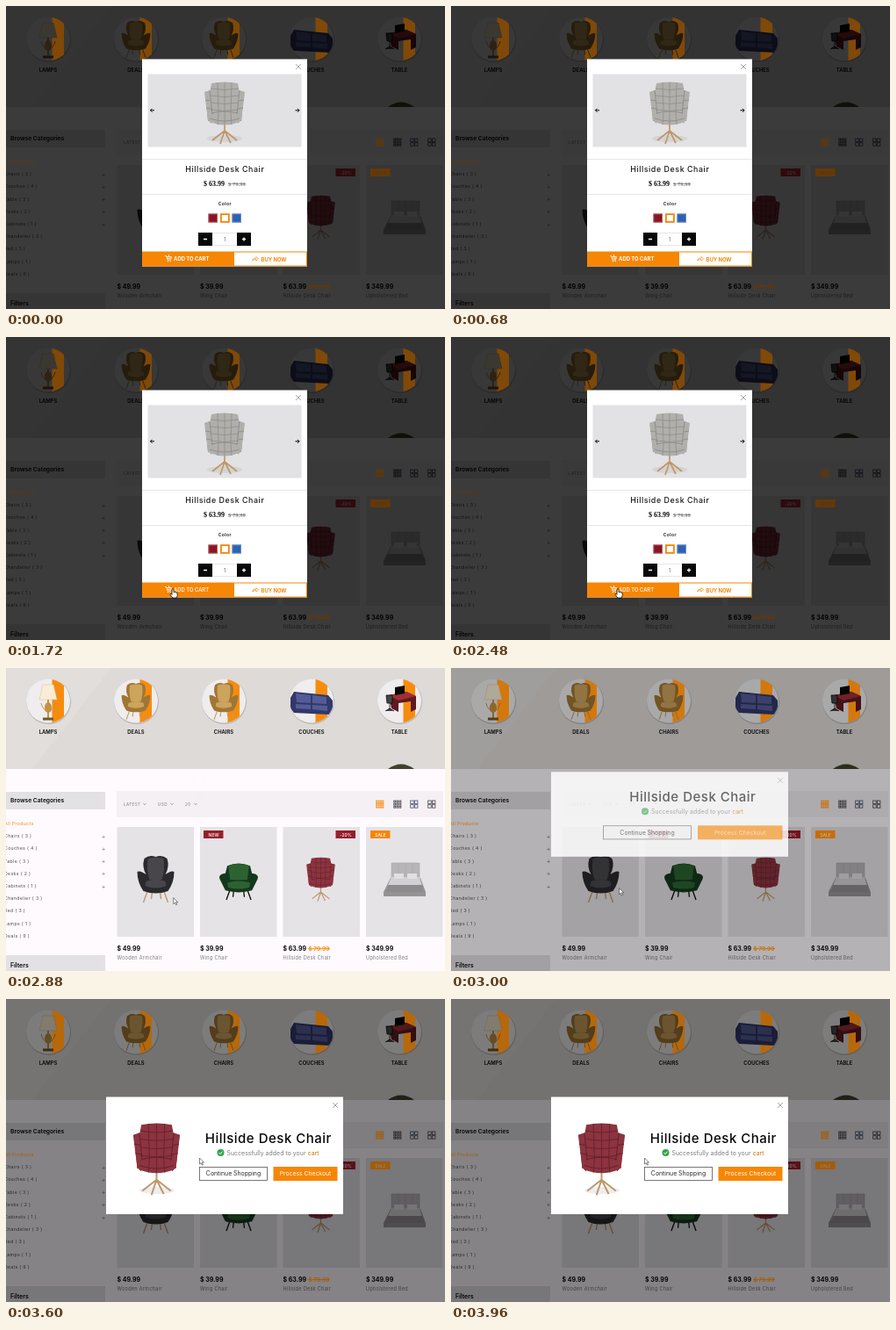
Animation of 500x345 px, one loop 4000 ms. Source, as an HTML page with a canvas:

```html
<!DOCTYPE html>
<html lang="en">
<head>
<meta charset="utf-8">
<title>Furniture shop: add to cart</title>
<style>
  html, body { margin: 0; width: 100%; height: 100%; overflow: hidden; }
  canvas { display: block; width: 500px; height: 345px; }
</style>
</head>
<body>
<canvas></canvas>
<script>
const canvas = document.querySelector('canvas');
const ctx = canvas.getContext('2d');
const ratio = window.devicePixelRatio || 1;
canvas.width = 500 * ratio;
canvas.height = 345 * ratio;

const LOOP = 4000;
const PRODUCT = 'Hillside Desk Chair';

// r, g, b and how strongly the colour follows the dimming of the page
const C = {
  white: [255, 255, 255], page: [255, 251, 255], black: [8, 8, 10], gray: [125, 123, 126],
  pale: [226, 225, 228], band: [229, 226, 230], bar: [245, 241, 245], card: [231, 228, 232],
  banner: [222, 219, 216], disc: [240, 238, 238], shadow: [188, 185, 183],
  orange: [246, 134, 4, .6], stripe: [246, 140, 14, .45], red: [150, 28, 40, .8],
  green: [50, 165, 75], blue: [42, 98, 180], wood: [190, 152, 105], gold: [196, 146, 66], icon: [70, 67, 76],
};
const FABRIC = {
  gray: [[176, 175, 171], [139, 138, 134]],
  red: [[140, 52, 64], [100, 32, 44]],
  green: [[44, 98, 48], [20, 56, 28]],
  dark: [[72, 70, 74], [42, 41, 45]],
  mustard: [[204, 164, 92], [160, 118, 52]],
  navy: [[84, 92, 152], [50, 56, 106]],
};

let light = 1;
const tone = ([r, g, b, power = 1]) =>
  `rgb(${[r, g, b].map(v => Math.round(v * light ** power))})`;
const clamp = v => Math.max(0, Math.min(1, v));
const progress = (t, start, length) => clamp((t - start) / length);
const mix = (a, b, p) => a + (b - a) * p;

function rect(x, y, w, h, color) {
  ctx.fillStyle = tone(color);
  ctx.fillRect(x, y, w, h);
}

function frame(x, y, w, h, color, width = 1) {
  ctx.strokeStyle = tone(color);
  ctx.lineWidth = width;
  ctx.strokeRect(x + width / 2, y + width / 2, w - width, h - width);
}

function shape(d, fill, stroke, width = 1) {
  const path = new Path2D(d);
  if (fill) { ctx.fillStyle = tone(fill); ctx.fill(path); }
  if (stroke) { ctx.strokeStyle = tone(stroke); ctx.lineWidth = width; ctx.stroke(path); }
}

function oval(x, y, rx, ry, color) {
  ctx.beginPath();
  ctx.ellipse(x, y, rx, ry, 0, 0, 7);
  ctx.fillStyle = tone(color);
  ctx.fill();
}

function text(str, x, y, size, color, { weight = 400, space = 0, align = 'left', family = 'Inter, sans-serif' } = {}) {
  ctx.font = `${weight} ${size}px ${family}`;
  ctx.letterSpacing = space + 'px';
  ctx.textAlign = align;
  ctx.fillStyle = tone(color);
  ctx.fillText(str, x, y);
}

function at(x, y, scale, draw) {
  ctx.save();
  ctx.translate(x, y);
  ctx.scale(scale, scale);
  draw();
  ctx.restore();
}

// Furniture; x is the middle, y the top
function tuftedChair(x, y, scale, [main, seam]) {
  at(x, y, scale, () => {
    shape('M0 47V58M0 55L-14 66M0 55L14 66M0 55L-5 70M0 55L7 69', null, C.wood, 1.7);
    shape('M-16 9L-22 11L-19 44H19L22 11L16 9Z', seam);
    shape('M-15 1Q0 -2 15 1L17 12L14 38H-14L-17 12Z', main);
    shape('M-23 11L-17 9L-14 36L-15 47L-19 43ZM23 11L17 9L14 36L15 47L19 43Z', main);
    shape('M-15 35Q0 31 15 35L17 45Q0 52 -17 45Z', main);
    for (let i = 0; i < 4; i++) shape(`M-16 ${7 + i * 8}Q0 ${10 + i * 8} 16 ${7 + i * 8}`, null, seam, .7);
    for (const i of [-1, 0, 1]) shape(`M${i * 8} 0L${i * 7} 34L${i * 8} 48`, null, seam, .7);
    shape('M-15 35Q0 31 15 35M-17 41Q0 47 17 41M-22 20L-16 21M-21 29L-15 30M22 20L16 21M21 29L15 30M-17 9L-14 36M17 9L14 36', null, seam, .8);
  });
}

function wingChair(x, y, scale, [main, seam]) {
  at(x, y, scale, () => {
    shape('M-9 38L-14 52M9 38L14 52M-4 40L-5 48M5 40L6 48', null, C.wood, 1.4);
    shape('M-13 2Q-7 -3 0 0Q7 -3 13 2Q16 11 11 20Q18 15 21 17Q21 29 14 39Q0 44 -14 39Q-21 29 -21 17Q-18 15 -11 20Q-16 11 -13 2Z', seam);
    shape('M-9 2Q0 -1 9 2Q11 15 7 26H-7Q-11 15 -9 2Z', main);
    shape('M-11 28Q0 23 11 28L12 33Q0 38 -12 33Z', main);
  });
}

function tubChair(x, y, scale, [main, seam]) {
  at(x, y, scale, () => {
    shape('M-8 24L-13 38M8 24L13 38M-5 26L-6 35M5 26L6 35', null, C.black, 1.2);
    shape('M-12 2Q0 -3 12 2L14 10Q22 11 20 16L14 28Q0 32 -14 28L-20 16Q-22 11 -14 10Z', seam);
    shape('M-11 2Q0 -2 11 2L9 17L-9 17ZM-12 20Q0 16 12 20L11 25Q0 28 -11 25Z', main);
  });
}

function bed(x, y) {
  at(x, y, 1, () => {
    shape('M-15 0H17V20H-15Z', [184, 181, 184], [160, 157, 160], .5);
    shape('M-7 0V18M1 0V18M9 0V18', null, [164, 161, 164], .4);
    shape('M-16 17H18L24 33V38H-24V33Z', [150, 147, 149]);
    shape('M-15 16H17L21 30Q0 33 -21 30Z', [212, 209, 212]);
    shape('M-12 12H-1V18H-12ZM3 12H14V18H3Z', [226, 224, 226]);
    shape('M-19 25H20L22 33H-22Z', [142, 139, 143]);
  });
}

function lamp(x, y) {
  shape(`M${x} ${y + 16}V${y + 38}`, null, C.gold, 2);
  oval(x, y + 26, 4, 6, C.gold);
  shape(`M${x - 8} ${y + 21}Q${x - 6} ${y + 29} ${x} ${y + 31}Q${x + 6} ${y + 29} ${x + 8} ${y + 21}`, null, C.gold, 1);
  shape(`M${x - 6} ${y + 39}H${x + 6}`, null, [120, 86, 40], 3);
  shape(`M${x - 6} ${y}H${x + 6}L${x + 10} ${y + 17}H${x - 10}Z`, [250, 238, 214], [214, 190, 150], .5);
}

function sofa(x, y) {
  const [main, seam] = FABRIC.navy;
  at(x, y, 1, () => {
    shape('M-20 0L19 4L24 10V23L20 26L-20 24L-24 19V7Z', seam);
    shape('M-18 2L-1 4V13L-17 12ZM1 4L17 6V14L1 13ZM-18 14L-1 15V20L-18 19ZM1 15L18 16V22L1 20Z', main);
  });
}

function desk(x, y) {
  at(x, y, 1, () => {
    shape('M-12 9L8 5L19 10V25L13 28V16L-1 18V28L-9 24Z', [96, 26, 34]);
    shape('M-12 9L8 5L19 10L-1 15Z', [158, 48, 54]);
    shape('M-5 0L6 -2V7L-5 9Z', C.black);
    shape('M-15 9H-8V18H-14ZM-11 18V25M-16 27L-11 24L-6 27', FABRIC.dark[0], C.black, .8);
  });
}

const categories = [
  ['LAMPS', x => lamp(x, 19)],
  ['DEALS', x => wingChair(x, 18, .78, FABRIC.mustard)],
  ['CHAIRS', x => wingChair(x, 18, .78, FABRIC.mustard)],
  ['COUCHES', x => sofa(x, 27)],
  ['TABLE', x => desk(x, 22)],
];

function drawBanner() {
  rect(0, 0, 500, 115, C.banner);
  shape('M0 0H120L30 115H0Z', [226, 223, 220]);
  shape('M435 115Q450 104 465 115Z', [62, 66, 44]);
  categories.forEach(([label, draw], i) => {
    const x = 48 + i * 100;
    oval(x + .5, 38.3, 25.6, 25.6, C.shadow);
    oval(x, 37.5, 25, 25, C.disc);
    ctx.save();
    ctx.beginPath();
    ctx.arc(x, 37.5, 25, 0, 7);
    ctx.clip();
    rect(x + 4.5, 12, 13.5, 51, C.stripe);
    draw(x);
    ctx.restore();
    text(label, x, 75, 5.9, C.black, { weight: 600, align: 'center' });
  });
}

function drawSidebar() {
  const heading = { weight: 600 };
  rect(0, 141, 113, 20, C.band);
  text('Browse Categories', 5, 153, 6.7, C.black, heading);
  ['All Products', 'Chairs ( 3 )', 'Couches ( 4 )', 'Table ( 3 )', 'Desks ( 2 )', 'Cabinets ( 1 )',
    'Chandelier ( 3 )', 'Bed ( 3 )', 'Lamps ( 1 )', 'Deals ( 9 )'].forEach((label, i) => {
    const y = 179 + i * 14.2;
    text(label, -2, y, 5.2, i ? [78, 76, 80] : C.orange, { space: .35 });
    if (i > 0 && i < 6) text('+', 111, y + .5, 7, C.gray, { align: 'center' });
  });
  rect(0, 327, 113, 18, C.band);
  text('Filters', 5, 340.5, 6.9, C.black, heading);
}

function gridIcon(x, columns, rows, color) {
  const w = 9.4 / columns, h = 9.4 / rows;
  for (let i = 0; i < columns * rows; i++) {
    const left = x - 4.7 + (i % columns) * w, top = 150.6 + Math.floor(i / columns) * h;
    frame(left, top, w - .4, h - .4, color, .8);
  }
}

function drawToolbar() {
  rect(126, 140, 372, 30, C.bar);
  [['LATEST', 134, 158], ['USD', 173, 189], ['20', 204, 216]].forEach(([label, x, arrow]) => {
    text(label, x, 156.7, 4.6, C.gray, { space: .4 });
    shape(`M${arrow - 1.7} 154L${arrow} 155.7L${arrow + 1.7} 154`, null, C.gray, .7);
  });
  gridIcon(426, 4, 4, C.orange);
  gridIcon(446, 3, 3, C.icon);
  gridIcon(465, 2, 2, [70, 78, 108]);
  gridIcon(485, 2, 2, C.icon);
}

const products = [
  ['Wooden Armchair', '$ 49.99', x => wingChair(x, 215, 1, FABRIC.dark)],
  ['Wing Chair', '$ 39.99', x => tubChair(x, 223, 1.08, FABRIC.green), 'NEW', C.red, 4],
  [PRODUCT, '$ 63.99', x => tuftedChair(x - 1, 216, .71, FABRIC.red), '-20%', C.red, 60],
  ['Upholstered Bed', '$ 349.99', x => bed(x, 222), 'SALE', C.orange, 5],
];

function drawProducts() {
  products.forEach(([name, price, draw, badge, color, offset], i) => {
    const x = 126.5 + i * 94.5;
    rect(x, 181, 87.5, 125, C.card);
    draw(x + 44);
    if (badge) {
      rect(x + offset, 185, 22.5, 9, color);
      text(badge, x + offset + 11.5, 191.5, 5, C.white, { weight: 500, align: 'center' });
    }
    text(price, x, 322, 7, C.black, { weight: 700 });
    text(name, x, 332, 5.5, C.gray, { space: .3 });
  });
  text('$ 79.99', 344.5, 322, 6.5, C.orange, { weight: 600 });
  rect(344, 319.2, 25, .9, C.orange);
}

function drawClose(x, y) {
  shape(`M${x - 3} ${y - 3}L${x + 3} ${y + 3}M${x + 3} ${y - 3}L${x - 3} ${y + 3}`, null, [150, 150, 152], .8);
}

function drawQuickView(hover) {
  const serif = { weight: 700, family: '"Liberation Serif", serif' };
  rect(155, 60.5, 188, 236, C.white);
  drawClose(333, 69);
  rect(161.5, 77.5, 175, 83, C.pale);
  oval(249, 151, 20, 4, [212, 211, 213]);
  tuftedChair(249, 87, 1, FABRIC.gray);
  shape('M169 118.8H164.5M166.5 116.8L164.5 118.8L166.5 120.8M329.5 118.8H334M332 116.8L334 118.8L332 120.8', null, C.black, 1);
  rect(155, 174, 188, .8, C.pale);
  text(PRODUCT, 249.3, 189, 8.9, [25, 25, 28], { weight: 500, space: .55, align: 'center' });
  text('$ 63.99', 225, 204.8, 8, C.black, serif);
  text('$ 79.99', 253, 204.5, 6.6, C.gray, serif);
  rect(253, 202, 20, .7, C.gray);
  rect(155, 214, 188, .8, C.pale);
  text('Color', 249.3, 227, 5, C.black, { weight: 600, space: .4, align: 'center' });
  rect(230.5, 236.5, 10.5, 10, [140, 20, 34]);
  frame(230.5, 236.5, 10.5, 10, [175, 120, 126], .8);
  frame(244, 236.2, 10.8, 10.6, C.orange, 1.8);
  rect(257.5, 236.5, 10.5, 10, C.blue);
  frame(257.5, 236.5, 10.5, 10, [130, 150, 190], .8);

  frame(219, 258, 60, 15, C.pale, .8);
  rect(219, 258, 16, 15, C.black);
  rect(263, 258, 16, 15, C.black);
  shape('M225 265.5H229M269 265.5H273M271 263.5V267.5', null, C.white, 1.3);
  text('1', 249, 268, 6.5, C.gray, { align: 'center' });

  rect(155, 279.5, 104, 17, C.orange);
  shape('M181 284.5H182.5L184 289H187.5L188.5 285.5H183M184 287.2H188M185.5 283V285', null, C.white, .8);
  oval(184.5, 290.5, .7, .7, C.white);
  oval(187.2, 290.5, .7, .7, C.white);
  text('ADD TO CART', 191, 290.3, 5.9, C.white, { weight: hover ? 500 : 700 });
  frame(259, 279.5, 84, 17, C.orange, 1);
  shape('M280.5 290Q281 287 285 287V285.5L287.5 288L285 290V288.7Q282 288.5 280.5 290Z', null, C.orange, .7);
  text('BUY NOW', 290.5, 290.5, 5.9, C.orange, { weight: 700 });
}

function popupButton(label, x, width, y, filled) {
  if (filled) rect(x, y, width, 16, C.orange);
  else frame(x, y, width, 16, [85, 85, 88], .8);
  text(label, x + width / 2, y + 10.3, filled ? 6.8 : 6.9, filled ? C.white : [40, 40, 44], { align: 'center' });
}

function drawAddedPopup(withImage, opacity) {
  const top = withImage ? 111.5 : 129;
  const dx = withImage ? 23.5 : 0, dy = withImage ? 1 : 0;
  // The white panel becomes solid before its contents do
  ctx.globalAlpha = 1 - (1 - opacity) ** 2;
  rect(114, top, 270, withImage ? 133.5 : 96.5, C.white);
  ctx.globalAlpha = opacity;
  drawClose(375, top + 9.5);
  if (withImage) {
    oval(172, 218, 20, 4, [238, 236, 238]);
    tuftedChair(171.5, 142, 1.16, FABRIC.red);
  }
  text(PRODUCT, 275.3 + dx, 163 + dy, 15, C.black, { weight: 500, space: .5, align: 'center' });
  oval(221 + dx, 174 + dy, 4, 4, C.green);
  shape(`M${219 + dx} ${174 + dy}l1.5 1.6l2.6 -3`, null, C.white, 1);
  text('Successfully added to your', 228 + dx, 177 + dy, 6.9, C.gray, { space: .05 });
  text('cart', 333 + dx, 177 + dy, 6.9, [210, 112, 4], { align: 'right' });
  if (withImage) {
    popupButton('Continue Shopping', 220, 78, 191, false);
    popupButton('Process Checkout', 304.5, 73, 191, true);
  } else {
    popupButton('Continue Shopping', 173, 101, 190, false);
    popupButton('Process Checkout', 281, 96.5, 190, true);
  }
}

function drawCursor(t) {
  if (t < 1200) return;
  if (t < 2600) {
    at(189, 286.5, 1, () => shape(
      'M0 1Q1 -.6 2 1V4Q3 3.3 3.6 4.3Q4.5 3.7 5 4.8Q6 4.4 6.2 5.4V8L5.2 10.5H.8L-2 6.8Q-1.8 5.6 -.6 6.2L0 6.8Z',
      C.white, C.black, .8));
    return;
  }
  const leave = progress(t, 2600, 400), rise = progress(t, 3000, 260);
  const x = mix(mix(189, 191.5, leave), 220.5, rise);
  const y = mix(mix(286.5, 251, leave), 181, rise);
  at(x, y, 1, () => shape('M0 0V7L1.6 5.6L2.8 8.2L4 7.6L2.8 5.1H5Z', C.white, [50, 50, 54], .6));
}

function drawScene(t) {
  const closing = progress(t, 2600, 240);
  const opening = progress(t, 2880, 200);
  ctx.setTransform(ratio, 0, 0, ratio, 0, 0);

  light = mix(mix(.235, 1, closing), .52, opening);
  rect(0, 0, 500, 345, C.page);
  drawBanner();
  drawSidebar();
  drawToolbar();
  drawProducts();

  light = 1;
  if (closing < 1) {
    ctx.globalAlpha = 1 - closing;
    drawQuickView(t >= 1200);
  }
  if (opening > 0) {
    const remaining = (1 - progress(t, 2880, 300)) ** 2;
    ctx.save();
    ctx.translate(0, -30 * remaining);
    drawAddedPopup(t >= 3500, opening);
    ctx.restore();
  }
  ctx.globalAlpha = 1;
  drawCursor(t);
}

const start = performance.now();
function tick(now) {
  drawScene(Math.max(0, now - start) % LOOP);
  requestAnimationFrame(tick);
}
tick(start);
</script>
</body>
</html>
```
